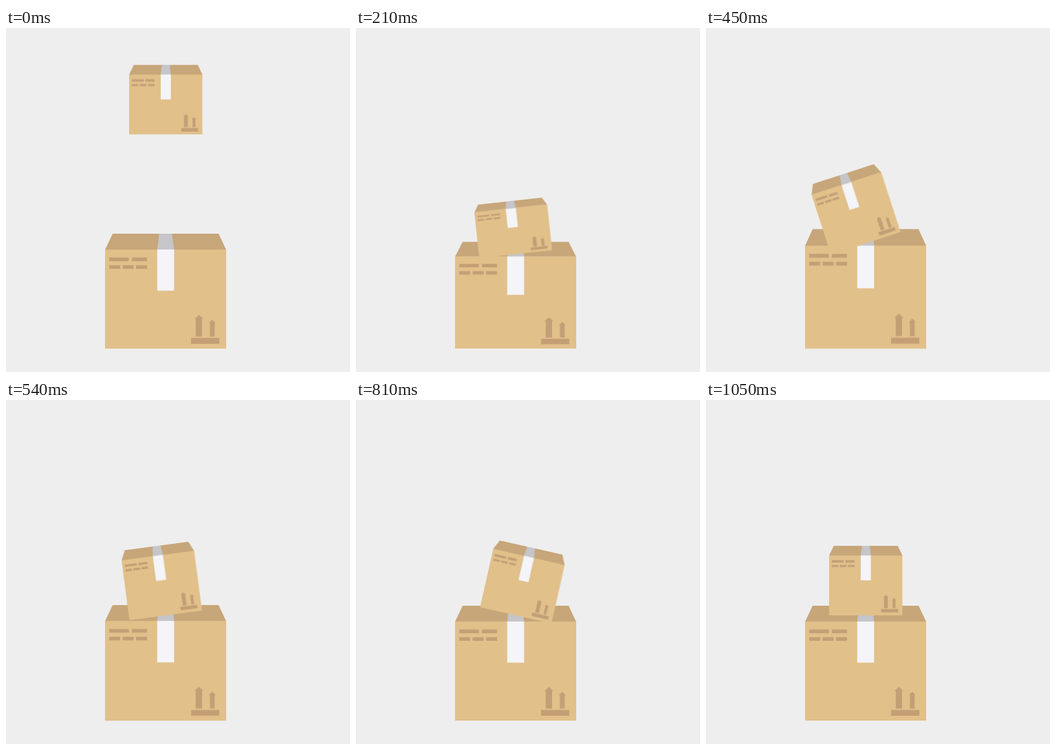
An HTML page that plays this animation: 500x500 px, repeating every 1.38 s.

```html
<!DOCTYPE html>
<html lang="en">
<head>
<meta charset="utf-8">
<title>Stacking boxes</title>
<style>
  html, body { margin: 0; width: 100%; height: 100%; overflow: hidden; background: #eee; }
  svg { display: block; width: 100%; height: 100%; }

  /* Every part pivots on the middle of its box's bottom edge. */
  .big, .drop, .tilt, .squash {
    transform-origin: 0 0;
    animation: 1380ms cubic-bezier(.37, 0, .63, 1) infinite;
  }
  .big { animation-name: big; }
  .drop { animation-name: drop; }
  .tilt { animation-name: tilt; }
  .squash { animation-name: squash; }

  /* 150, 300, 450, 570 ms */
  @keyframes big {
    0%, 10.87% { transform: scaleY(1); }
    21.74% { transform: scaleY(.8); }
    32.61% { transform: scaleY(1.04); }
    41.3%, 100% { transform: scaleY(1); }
  }
  /* 120, 300, 450 ms */
  @keyframes drop {
    0% { transform: translateY(-163px); animation-timing-function: cubic-bezier(.4, 0, .9, .8); }
    8.7% { transform: translateY(0); }
    21.74% { transform: translateY(31px); }
    32.61%, 100% { transform: translateY(0); }
  }
  /* 40, 465, 674, 1050 ms */
  @keyframes tilt {
    0%, 2.9% { transform: rotate(0deg); }
    33.7% { transform: rotate(-18deg); }
    48.84% { transform: rotate(18deg); }
    76.09%, 100% { transform: rotate(0deg); }
  }
  /* 120, 270, 450, 570 ms */
  @keyframes squash {
    0%, 8.7% { transform: scaleY(1); }
    19.57% { transform: scaleY(.65); }
    32.61% { transform: scaleY(1.047); }
    41.3%, 100% { transform: scaleY(1); }
  }
</style>
</head>
<body>
<svg viewBox="0 0 500 500">
  <defs>
    <g id="box">
      <path fill="#c7a679" d="M-88-143.8L-77-167H77L88-143.8Z"/>
      <path fill="#e1c08a" d="M-88-144H88V0H-88Z"/>
      <path fill="#c5c5ca" d="M-12.2-144L-9.4-167H9.4L12.3-144Z"/>
      <path fill="#f4f4f9" d="M-12.2-144H12.3V-84.2H-12.2Z"/>
      <g fill="#c49f76">
        <path d="M-82-132.5h28.6v5.4h-28.6zM-49-132.5h22v5.4h-22z"/>
        <path d="M-82-121.3h16v5.3h-16zM-62.5-121.3h16v5.3h-16zM-43-121.3h16v5.3h-16z"/>
        <path d="M37-15.4H78V-7H37Z"/>
        <path d="M48.4-49L55-43H53V-17.5H43.8V-43H41.8Z"/>
        <path d="M67.8-41.7L73-37H71.3V-17.5H64.4V-37H62.6Z"/>
      </g>
    </g>
  </defs>
  <g transform="translate(232 466)">
    <g class="big"><use href="#box"/></g>
  </g>
  <g transform="translate(232.2 313)">
    <g class="drop"><g class="tilt"><g class="squash">
      <use href="#box" transform="scale(.605)"/>
    </g></g></g>
  </g>
</svg>
</body>
</html>
```
